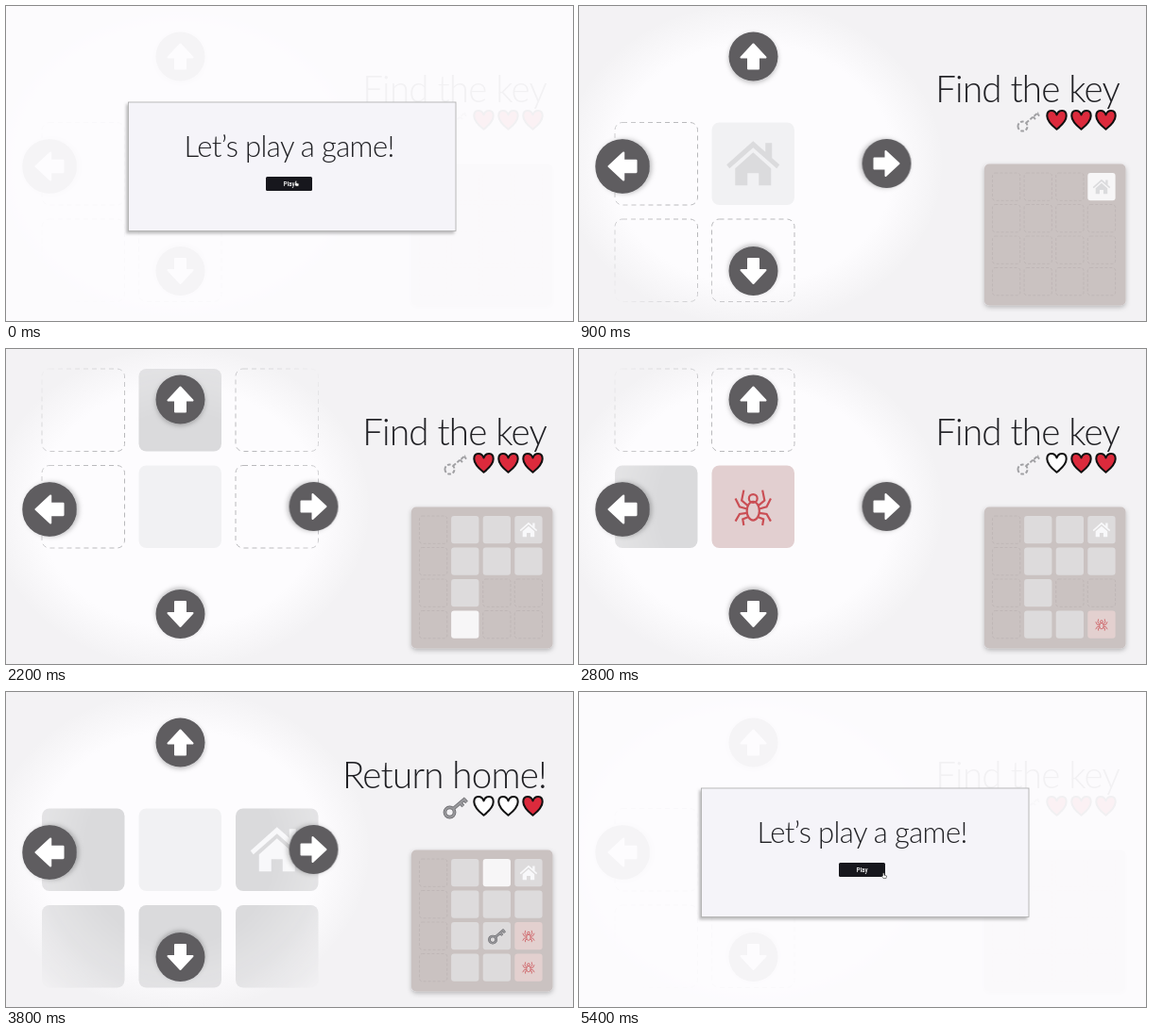
Animation of 600x334 px, one loop 5500 ms. Source, as an HTML page:

```html
<!DOCTYPE html>
<html lang="en">
<head>
<meta charset="utf-8">
<title>Find the key</title>
<style>
html, body { margin: 0; width: 100%; height: 100%; overflow: hidden; background: #f3f2f4; }
svg { display: block; width: 600px; height: 334px; }
text { font-family: Lato, Roboto, sans-serif; font-weight: 300; letter-spacing: -.02em; fill: #202024; }
.label { font: 500 6.3px Roboto, Lato, sans-serif; letter-spacing: 0; fill: #fff; }
</style>
</head>
<body>
<svg viewBox="0 0 600 334">
  <defs>
    <radialGradient id="glow">
      <stop offset=".74" stop-color="#fdfcfe"/>
      <stop offset="1" stop-color="#fdfcfe" stop-opacity="0"/>
    </radialGradient>
    <radialGradient id="fade" gradientUnits="userSpaceOnUse" cx="184" cy="167" r="208">
      <stop offset=".48" stop-color="#fff"/>
      <stop offset=".72" stop-color="#bbb"/>
      <stop offset="1" stop-color="#000"/>
    </radialGradient>
    <mask id="lens" maskUnits="userSpaceOnUse" x="0" y="0" width="420" height="334">
      <rect width="420" height="334" fill="url(#fade)"/>
    </mask>
    <filter id="shadow" x="-20%" y="-20%" width="140%" height="140%">
      <feDropShadow dx="0" dy="2" stdDeviation="2.5" flood-opacity=".25"/>
    </filter>
    <filter id="lift" x="-10%" y="-10%" width="120%" height="120%">
      <feDropShadow dx="-2" dy="2.5" stdDeviation="1.6" flood-opacity=".25"/>
    </filter>
    <path id="house" d="M-19,5 L0,-12 L19,5 V23 H6 V10 H-6 V23 H-19Z
      M-28,1 L0,-24 L13,-12.5 V-22 H20 V-6 L28,1 L25,5 L0,-17 L-25,5Z"/>
    <path id="key" fill="none" d="M-24,12 a11,11 0 1 0 22,0 a11,11 0 1 0 -22,0
      M-5,4 L23,-20 M11,-10 L18,-2 M20,-18 L26,-11"/>
    <path id="legs" d="M5,-1 L11,-6 L9,-16 M6,2 L13,0 L17,-8 M6,6 L13,7 L17,14 M5,10 L10,12 L9,18"/>
    <g id="spider" fill="none" stroke="#c9484e" stroke-width="2">
      <ellipse cy="4" rx="6" ry="9"/><circle cy="-8" r="4"/>
      <use href="#legs"/><use href="#legs" transform="scale(-1 1)"/>
    </g>
    <path id="heart" stroke="#111" stroke-width="2" stroke-linejoin="round"
      d="M0,10 C-5,6 -10,1 -10,-4 C-10,-11 -2,-11 0,-5 C2,-11 10,-11 10,-4 C10,1 5,6 0,10Z"/>
    <g id="arrow">
      <circle r="26" fill="#5e5d60" filter="url(#shadow)"/>
      <path d="M0,-13 L13,1 H5.5 V13 H-5.5 V1 H-13Z" fill="#fff" stroke="#fff" stroke-width="2" stroke-linejoin="round"/>
    </g>
  </defs>

  <rect width="600" height="334" fill="#f3f2f4"/>
  <ellipse cx="184" cy="168" rx="202" ry="172" fill="url(#glow)"/>
  <g id="board" mask="url(#lens)"></g>
  <use href="#arrow" transform="translate(184.5 53.5)"/>
  <use href="#arrow" transform="translate(184.5 281) rotate(180)"/>
  <use href="#arrow" transform="translate(325.5 167) rotate(90)"/>
  <use href="#arrow" transform="translate(46 170) rotate(-90) scale(1.11)"/>
  <text id="goal" x="572" y="102" font-size="38.5" text-anchor="end"></text>
  <g id="status"></g>
  <rect x="429" y="167.5" width="149.5" height="150" rx="5" fill="#cac2c1" filter="url(#shadow)"/>
  <g id="map"></g>

  <g id="dialog">
    <rect width="600" height="334" fill="#fdfcfe" opacity=".95"/>
    <rect x="129.5" y="102" width="346.5" height="136.5" fill="#f5f4f9" stroke="#aaa" stroke-width=".8" filter="url(#lift)"/>
    <text id="message" x="299.7" y="160" font-size="31" text-anchor="middle"></text>
    <rect x="275" y="181" width="49" height="15" rx="1.5" fill="#17171d"/>
    <text id="button" class="label" x="299.5" y="191" text-anchor="middle"></text>
    <path id="cursor" fill="#fff" stroke="#333" stroke-width=".6"
      d="M-1.5,-3 V0 L-2.6,0 L-1,2.6 H2 L2.6,0 L0,-.8 V-3Z"/>
  </g>
</svg>
<script>
const LOOP = 5500, STEP = 100, START = 900, WIN = 4000, RESET = 5200;
const $ = id => document.getElementById(id);

// Moves as [time, column, row]
const path = [
  [START, 3, 0], [1000, 3, 1], [1200, 2, 1], [1400, 2, 0], [1600, 1, 0], [1800, 1, 1],
  [2000, 1, 2], [2200, 1, 3], [2400, 2, 3], [2700, 3, 3], [3000, 3, 2], [3200, 2, 2],
  [3700, 2, 1], [3800, 2, 0], [WIN, 3, 0]
];
const items = { '3,0': 'house', '2,2': 'key', '3,3': 'spider', '3,2': 'spider' };

const use = (id, x, y, scale, attrs = '') =>
  `<use href="#${id}" transform="translate(${x} ${y}) scale(${scale})" ${attrs}/>`;

const box = (x, y, size, r, attrs) =>
  `<rect x="${x}" y="${y}" width="${size}" height="${size}" rx="${r}" ${attrs}/>`;

const solidKey = (x, y, scale) =>
  use('key', x, y, scale, 'stroke="#66666a" stroke-width="8"') +
  use('key', x, y, scale, 'stroke="#98989b" stroke-width="5"');

function icon(item, x, y, scale, here, t) {
  if (item === 'house') return use(item, x, y, scale, `fill="${here ? '#dbdbdd' : '#f8f8fa'}"`);
  if (item === 'key') return solidKey(x, y, scale);
  const pulse = t < 3300 && t / STEP % 2 ? .6 : .95;
  return use(item, x, y, scale * 1.1, `opacity="${pulse}"`);
}

function tile(col, row, x, y, size, game, mini) {
  const name = col + ',' + row, item = items[name];
  const r = mini ? 3 : 8;
  if (!game.seen.has(name)) {
    const look = mini ? 'stroke="#bbb2b2" stroke-width=".7" stroke-dasharray="3 2"'
                      : 'stroke="#b9b9bc" stroke-dasharray="5 4"';
    return box(x, y, size, r, 'fill="none" ' + look);
  }
  const here = game.col === col && game.row === row;
  const fill = item === 'spider' ? (mini ? '#e3d0cf' : '#e2cfd0')
    : here ? (mini ? '#f7f6f7' : '#f1f1f3') : mini ? '#dddbdc' : '#dadadc';
  return box(x, y, size, r, `fill="${fill}"`) +
    (item ? icon(item, x + size / 2, y + size / 2, mini ? .33 : 1, here, game.t) : '');
}

function drawGame(t) {
  const done = path.filter(p => p[0] <= t);
  const seen = new Set(done.map(([, c, r]) => c + ',' + r));
  const [, col, row] = done.at(-1) ?? path[0];
  const game = { seen, col, row, t };
  let board = '', map = '';
  for (let r = 0; r < 4; r++) for (let c = 0; c < 4; c++) {
    const dx = c - col, dy = r - row;
    if (Math.abs(dx) < 2 && Math.abs(dy) < 2)
      board += tile(c, r, 140.5 + dx * 102.5, 123.5 + dy * 102.5, 87.5, game, false);
    map += tile(c, r, 437.5 + c * 33.6, 177 + r * 33.5, 29.3, game, true);
  }
  $('board').innerHTML = board;
  $('map').innerHTML = map;

  const found = seen.has('2,2');
  const lost = seen.has('3,3') + seen.has('3,2');
  $('goal').textContent = found ? 'Return home!' : 'Find the key';
  let status = found ? solidKey(475.5, 122, .46)
    : use('key', 475.5, 122, .46, 'stroke="#a0a0a3" stroke-width="4.2" stroke-dasharray="8 4"');
  for (let i = 0; i < 3; i++)
    status += use('heart', 505.5 + i * 26, 120.5, 1.02, `fill="${i < lost ? '#fff' : '#dc2a3c'}"`);
  $('status').innerHTML = status;
}

function cursorAt(t) {
  if (t < START) return [307.5, 188.5];
  if (t < RESET) {
    const rest = (1 - Math.min(1, (t - 4500) / 500)) ** 1.5;
    return [305 + 275 * rest, 189 + 101 * rest];
  }
  const u = (t - RESET) / 200;
  return [305 + 18 * u, 189 + 6 * u];
}

function drawDialog(t) {
  const won = t >= WIN && t < RESET;
  const opacity = t >= WIN ? 1 : Math.max(0, Math.min(1, (800 - t) / 600));
  $('dialog').setAttribute('opacity', t < 300 ? 1 : opacity);
  $('message').textContent = won ? 'Well done!' : 'Let’s play a game!';
  $('button').textContent = won ? 'Replay!' : 'Play';
  $('cursor').setAttribute('transform', `translate(${cursorAt(t)})`);
  $('cursor').setAttribute('visibility', t >= WIN && t < 4500 ? 'hidden' : 'visible');
}

let start, last;
function frame(now) {
  start ??= now;
  const t = Math.floor((now - start) % LOOP / STEP) * STEP;
  if (t !== last) {
    drawGame(t >= RESET ? 0 : t);
    drawDialog(t);
    last = t;
  }
  requestAnimationFrame(frame);
}
requestAnimationFrame(frame);
</script>
</body>
</html>
```
